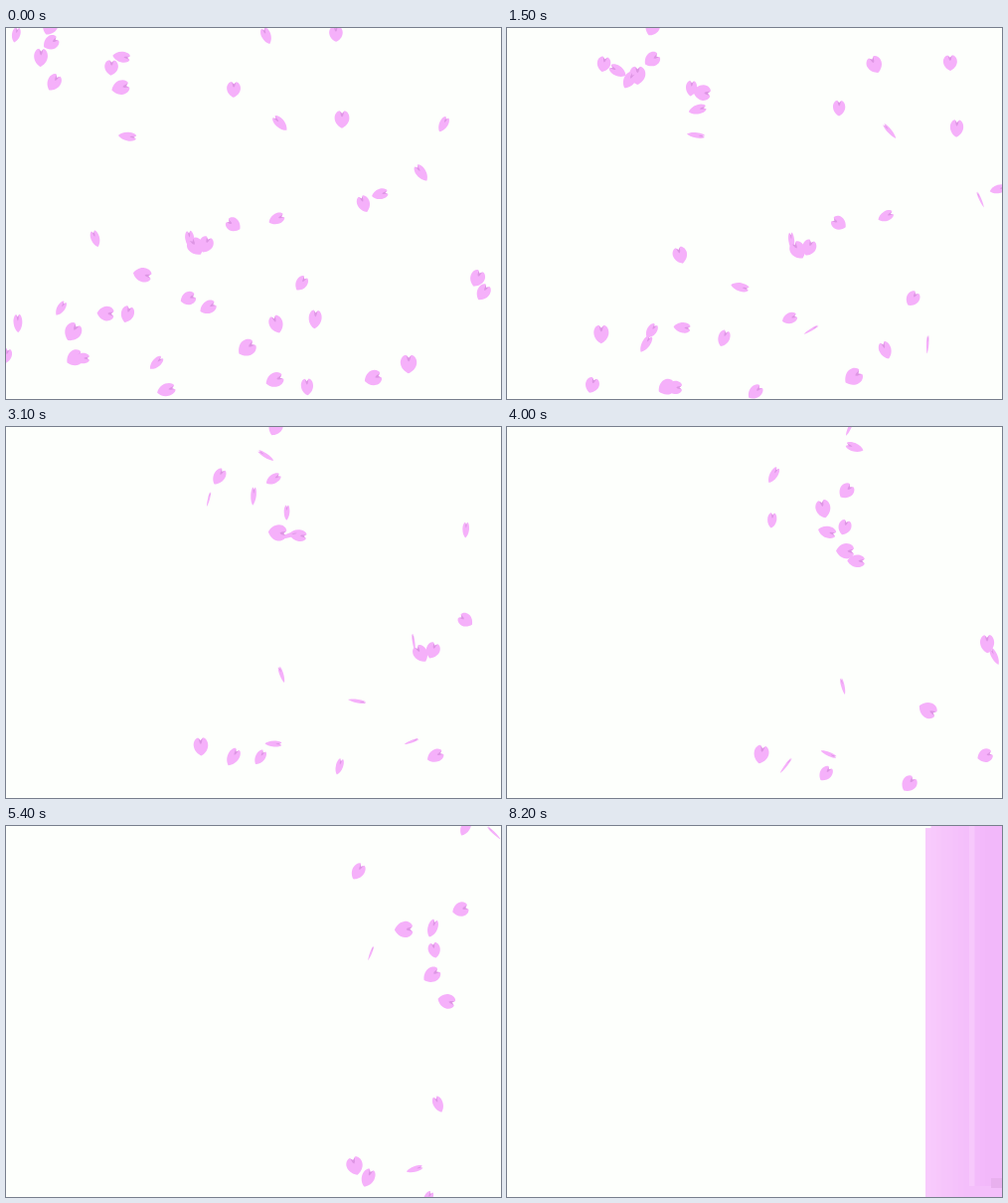
These frames come from a looping animation (498 px wide and 373 px high, 8300 ms). An HTML page:

```html
<!DOCTYPE html>
<html lang="en">
<head>
<meta charset="utf-8">
<title>Petals in the wind</title>
<style>
html, body { margin: 0; width: 100%; height: 100%; overflow: hidden; background: #fdfffc; }
svg { display: block; width: 498px; height: 373px; }
</style>
</head>
<body>
<svg id="stage" viewBox="0 0 498 373">
  <rect width="498" height="373" fill="#fdfffc"/>
  <g id="bands"></g>
  <g id="petals"></g>
</svg>
<script>
const W = 498, H = 373;
const LOOP = 8300, STEP = 100, CROSSING = 5400, WASH = 7000;
const PINK = '#f5b0fa', DUSK = '#e3a2ea';
const BLADE = 'M0 9C-3.5 7.5-7.6 4-8-1C-8.4-5.5-5.2-9-2.6-9L0-6.2L2.6-9C5.2-9 8.4-5.5 8-1C7.6 4 3.5 7.5 0 9Z';
const VEIN = 'M-2.2-8.4L0-6.2L2.2-8.4L1.2-4L0-2.5L-1.2-4Z';

// Slow petals that cross the stage: where they start and where they are after CROSSING.
const SWARM = [
  [10, 7, 367, 128], [44, -1, 462, 2], [45, 15, 457, 84], [35, 30, 429, 103],
  [48, 55, 354, 46], [-11, 55, 491, 7], [106, 40, 431, 125], [116, 29, 443, 176],
  [115, 60, 428, 150], [122, 109, 400, 104], [90, 212, 435, 280],
  [12, 297, 351, 342], [67, 306, 364, 354], [100, 287, 411, 345]
];

// Petals that the wind soon carries off: only where they start.
const LOOSE = [
  [262, 8], [332, 6], [229, 62], [276, 96], [338, 92], [440, 97], [418, 146],
  [376, 167], [360, 177], [272, 192], [229, 198], [185, 213], [191, 220], [201, 218],
  [474, 252], [480, 266], [297, 257], [311, 293], [272, 298], [242, 322], [203, 281],
  [183, 272], [137, 248], [122, 288], [55, 282], [0, 330], [69, 332], [76, 332],
  [151, 337], [161, 364], [270, 354], [303, 361], [369, 352], [405, 338]
];

let seed = 11;
function random(low, high) {
  seed = (seed * 16807) % 2147483647;
  return low + (high - low) * seed / 2147483647;
}

const byId = id => document.getElementById(id);

function make(parent, tag, attrs) {
  const el = document.createElementNS('http://www.w3.org/2000/svg', tag);
  for (const k in attrs) el.setAttribute(k, attrs[k]);
  return parent.appendChild(el);
}

// The wind is stronger to the right and sinks most near the top and the bottom.
function carried(x, y) {
  return [x, y, x + 350 + 0.35 * x, y + 50 + 70 * Math.cos(2 * Math.PI * y / 330)];
}

function petal([x, y, toX, toY]) {
  const g = make(byId('petals'), 'g', {});
  const blade = make(g, 'path', { d: BLADE });
  make(g, 'path', { d: VEIN, fill: '#d78fde', opacity: 0.8 });
  return {
    g, blade, x, y, dx: toX - x, dy: toY - y,
    size: random(0.85, 1.05),
    tilt: random(-60, 105),
    spin: random(-20, 20),
    turn: random(-1, 1),
    tumble: random(1.5, 3)
  };
}

const petals = [...SWARM, ...LOOSE.map(p => carried(...p))].map(petal);

// Pink wash: every step covers a narrower strip on the right.
const bands = [];
for (let k = 0; k < 12; k++) {
  const x = 421 + 5.5 * k, y = k ? 0 : 2;
  const fill = k === 8 ? '#f7c9fc' : `hsl(${295 - k * 0.2} 88% ${89 - k * 0.35}%)`;
  bands.push(make(byId('bands'), 'rect', { x, y, width: W - x, height: (k < 8 ? H : 362) - y, fill }));
}
bands.push(make(byId('bands'), 'rect', { x: 487, y: 354, width: 11, height: 10, fill: '#e8b0ee' }));

function draw(t) {
  bands.forEach((el, k) => el.setAttribute('visibility', t >= WASH + k * STEP ? 'visible' : 'hidden'));
  const gone = Math.pow(t / CROSSING, 1.1), sec = t / 1000;
  for (const p of petals) {
    const x = p.x + p.dx * gone, y = p.y + p.dy * gone;
    const open = Math.max(0.15, Math.abs(Math.cos(p.turn + p.tumble * sec)));
    const tilt = p.tilt + p.spin * Math.sin(sec * 2);
    p.g.setAttribute('transform', `translate(${x} ${y}) rotate(${tilt}) scale(${p.size * open} ${p.size})`);
    p.blade.setAttribute('fill', t >= WASH ? DUSK : PINK);
  }
}

const begin = performance.now();
function tick() {
  const t = (performance.now() - begin) % LOOP;
  draw(Math.floor(t / STEP) * STEP);
  requestAnimationFrame(tick);
}
draw(0);
requestAnimationFrame(tick);
</script>
</body>
</html>
```
